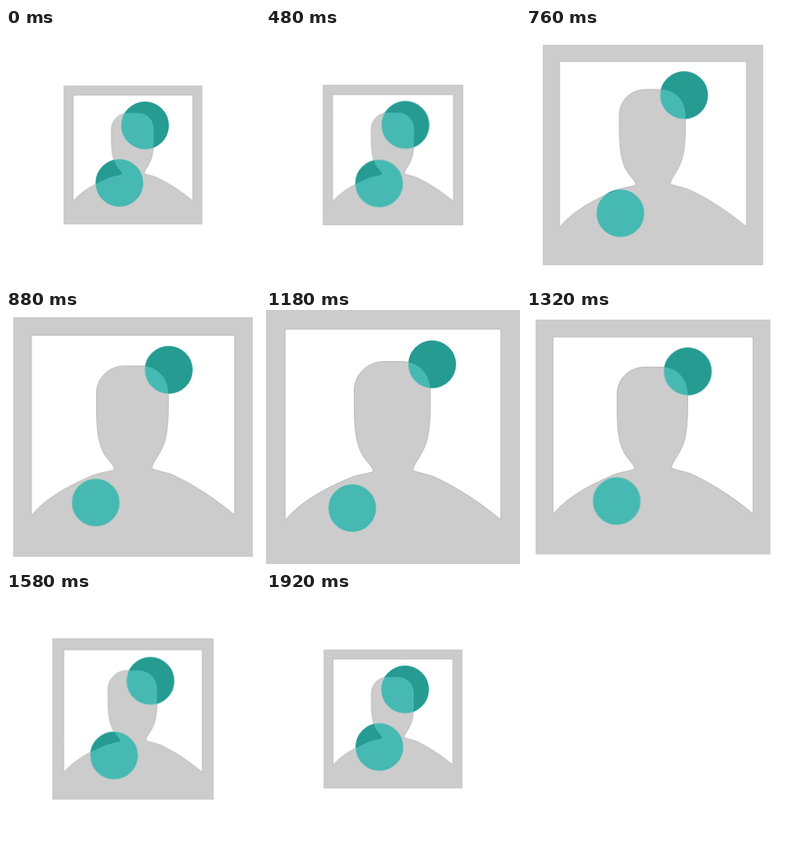
Recreate the animation shown at these times as an HTML page without scripts. Size 318 px wide and 318 px high, loop 2.5 s.

```html
<!DOCTYPE html>
<html lang="en">
<head>
<meta charset="utf-8">
<title>Avatar resize</title>
<style>
  html, body { margin: 0; height: 100%; overflow: hidden; background: #fff; }
  svg { display: block; width: 100vw; height: 100vh; }

  .frame { animation: frame 2500ms infinite; fill: #ccc; }
  .window { animation: window 2500ms infinite; }
  .top { animation: top 2500ms infinite; }
  .bottom { animation: bottom 2500ms infinite; }

  .paper { fill: #fff; stroke: #b0b0b0; stroke-width: .8; }
  .light { fill: #46b9b2; }
  .dark { fill: #269b92; }

  @keyframes frame {
    0%, 18.56% { transform: scale(.5472); animation-timing-function: ease; }
    47.28%, 48.84% { transform: scale(1); animation-timing-function: ease; }
    77.6%, 100% { transform: scale(.5472); }
  }
  @keyframes window {
    0%, 18.56% { transform: scale(.5556); animation-timing-function: ease; }
    47.28%, 48.84% { transform: scale(1); animation-timing-function: ease; }
    77.6%, 100% { transform: scale(.5556); }
  }
  @keyframes top {
    0%, 18.56% { transform: translate(-34px, 54px); animation-timing-function: ease; }
    47.28%, 48.84% { transform: translate(0, 0); animation-timing-function: ease; }
    77.6%, 100% { transform: translate(-34px, 54px); }
  }
  @keyframes bottom {
    0%, 18.56% { transform: translate(34px, -54px); animation-timing-function: ease; }
    47.28%, 48.84% { transform: translate(0, 0); animation-timing-function: ease; }
    77.6%, 100% { transform: translate(34px, -54px); }
  }
</style>
</head>
<body>
<svg viewBox="-159 -159 318 318">
  <defs>
    <!-- white area around the person -->
    <path id="window" vector-effect="non-scaling-stroke" d="M-135 -135H135V103.5
      C110 83 84 65 53 50.5C44 46.5 32 45 25 42
      C25 33 39 22 43.5 0C46 -13 46.8 -26 46.8 -40V-59
      C46.8 -76 34 -94.5 11 -94.5H-11
      C-34 -94.5 -48.5 -76 -48.5 -59V-36
      C-48.5 -10 -46 12 -36 26C-31 33 -24 39 -25 43.5
      C-32 46 -42 47 -51 50C-80 62 -116 80 -135 104.5Z"/>
    <clipPath id="outside">
      <use href="#window" class="window"/>
    </clipPath>
  </defs>

  <rect class="frame" x="-159" y="-159" width="318" height="318"/>
  <use href="#window" class="window paper"/>
  <g class="light">
    <circle class="top" cx="49" cy="-91" r="29.8"/>
    <circle class="bottom" cx="-51" cy="89" r="29.8"/>
  </g>
  <g class="dark" clip-path="url(#outside)">
    <circle class="top" cx="49" cy="-91" r="29.8"/>
    <circle class="bottom" cx="-51" cy="89" r="29.8"/>
  </g>
</svg>
</body>
</html>
```
